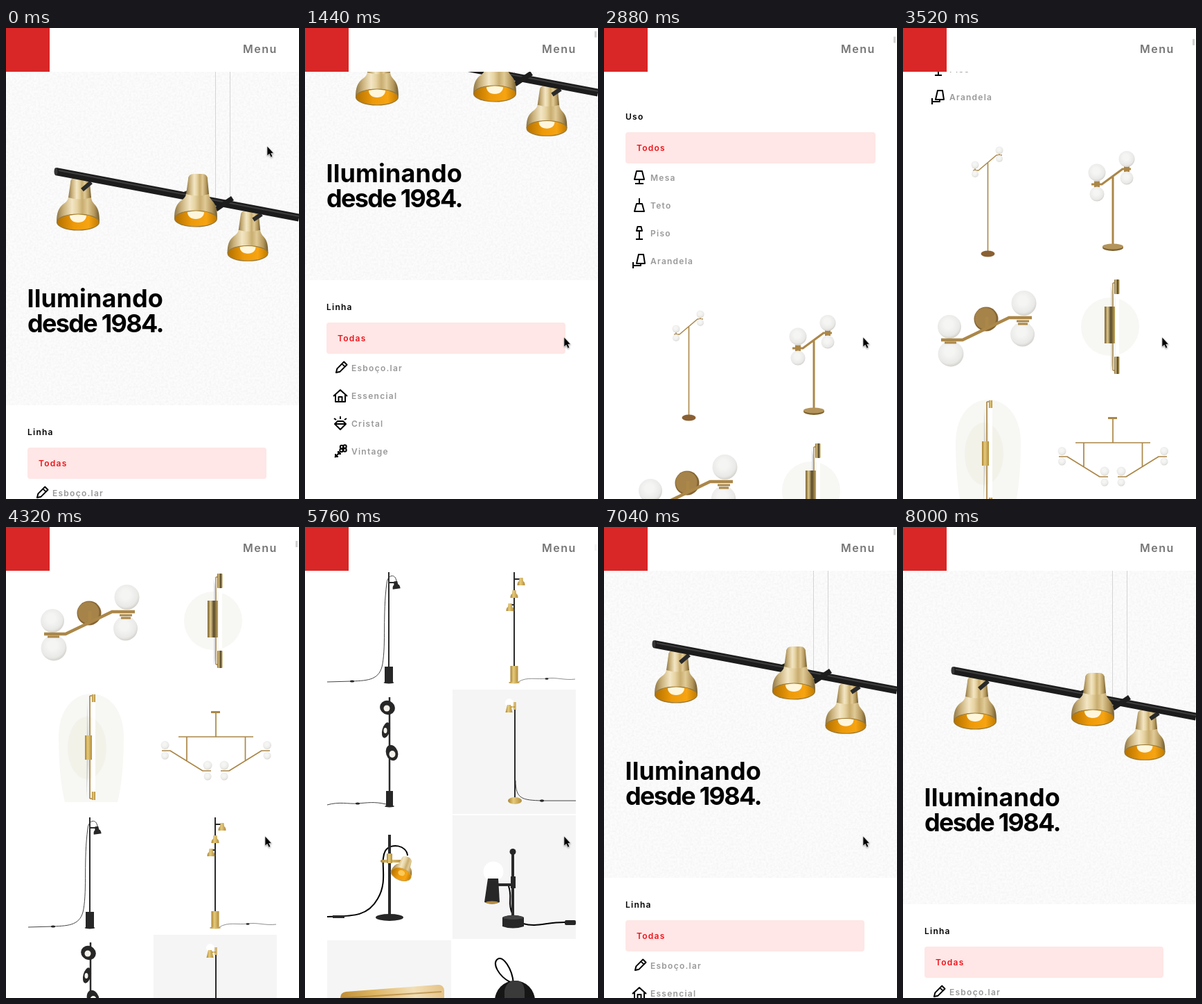
An HTML page that plays this animation: 423 by 678 pixels, repeating every 8800 ms.

```html
<!DOCTYPE html>
<html lang="pt">
<head>
<meta charset="utf-8">
<title>Iluminando</title>
<style>
@property --s { syntax: "<integer>"; inherits: true; initial-value: 0; }
html, body { margin: 0; width: 100%; height: 100%; overflow: hidden; background: #fff; }
#stage {
  position: relative; width: 423px; height: 678px; overflow: hidden; background: #fff;
  font: 600 12px Inter, "Open Sans", sans-serif; letter-spacing: 1.25px;
}
#stage, #thumb, #cursor { animation: 8.8s step-end -4ms infinite; }
#stage { animation-name: scroll; }
#page { position: absolute; left: 0; top: 0; transform: translateY(calc(var(--s) * -1px)); }
#head { position: absolute; left: 0; top: 0; width: 423px; height: 63px; background: #fff; }
#logo { width: 63px; height: 63px; background: #d92727; }
#menu { position: absolute; left: 342px; top: 20px; font-size: 16px; line-height: 20px; letter-spacing: 1.5px; color: #767676; }
#thumb {
  position: absolute; left: 418px; top: 1.5px; width: 3px; height: 9px; background: #d2d2d2;
  transform: translateY(calc(var(--s) * .0142px)); animation-name: thumb;
}
#cursor { position: absolute; left: 0; top: 0; animation-name: cursor; }

/* the page moves in ticks of 160 ms */
@keyframes scroll {
  0% { --s: 0; }
  7.2727% { --s: 0; animation-timing-function: steps(2); }
  10.909% { --s: 50; animation-timing-function: steps(3); }
  16.3636% { --s: 180; animation-timing-function: steps(9); }
  32.7272% { --s: 736; animation-timing-function: steps(9); }
  49.0909% { --s: 1267; animation-timing-function: steps(4); }
  56.3636% { --s: 1500; animation-timing-function: steps(3); }
  61.8181% { --s: 1614; }
  63.6363% { --s: 1620; }
  67.2727% { --s: 1330; }
  69.0909% { --s: 740; }
  70.909% { --s: 350; }
  72.7272% { --s: 235; animation-timing-function: steps(2); }
  76.3636% { --s: 105; animation-timing-function: steps(2); }
  80% { --s: 38; animation-timing-function: steps(3); }
  85.4545%, 100% { --s: 0; }
}
@keyframes thumb {
  0% { opacity: 0; }
  9.0909% { opacity: 1; }
  63.6363% { opacity: .6; }
  65.4545% { opacity: .25; }
  67.2727% { opacity: 1; }
  85.4545% { opacity: .4; }
  87.2727%, 100% { opacity: 0; }
}
@keyframes cursor {
  0% { transform: translate(377px, 170px); opacity: 1; }
  1.8181% { transform: translate(376px, 310px); }
  3.6363% { transform: translate(374px, 445px); opacity: 1; }
  87.2727%, 100% { transform: translate(374px, 445px); opacity: 0; }
}

svg { display: block; }
.title { font-size: 36px; font-weight: 700; }
.on { fill: #f0121a; }
.off { fill: #999; }
.pick { fill: #fee7e6; }
.icons, .line { fill: none; stroke: #000; stroke-width: 2; stroke-linejoin: round; }
.ball { fill: url(#ball); }
.brass { fill: none; stroke: #ab8748; stroke-linejoin: round; }
.gold { fill: url(#gold); }
.dark { fill: #272727; }
.cable { fill: none; stroke: #444; stroke-width: 1; }
.pole { fill: none; stroke: #2a2a2a; }
.pad { fill: #f5f5f5; }
.tint { fill: #f7f7f4; }
</style>
</head>
<body>
<div id="stage">
<svg id="page" width="423" height="2400">
  <defs>
    <filter id="grain" x="0" y="0" width="100%" height="100%" color-interpolation-filters="sRGB">
      <feTurbulence type="fractalNoise" baseFrequency=".32" numOctaves="2" seed="4"/>
      <feColorMatrix values="0 0 0 0 0  0 0 0 0 0  0 0 0 0 0  .06 0 0 0 -.02"/>
    </filter>
    <radialGradient id="ball" cx=".45" cy=".4" r=".6">
      <stop offset=".3" stop-color="#f5f5f4"/><stop offset=".8" stop-color="#e9e9e7"/><stop offset="1" stop-color="#d3d1cc"/>
    </radialGradient>
    <linearGradient id="gold">
      <stop offset="0" stop-color="#a8822f"/><stop offset=".4" stop-color="#e6cb7c"/><stop offset="1" stop-color="#b38c3a"/>
    </linearGradient>
    <linearGradient id="shade">
      <stop offset="0" stop-color="#8f7747"/><stop offset=".16" stop-color="#c9b07a"/><stop offset=".36" stop-color="#f3e6c4"/>
      <stop offset=".48" stop-color="#e6d3a2"/><stop offset=".6" stop-color="#c9ad70"/><stop offset=".72" stop-color="#e0ca96"/>
      <stop offset=".88" stop-color="#b3965a"/><stop offset="1" stop-color="#6f5a2f"/>
    </linearGradient>
    <linearGradient id="inner">
      <stop offset="0" stop-color="#b37000"/><stop offset=".4" stop-color="#ee9a08"/><stop offset=".75" stop-color="#f7a412"/><stop offset="1" stop-color="#c07a00"/>
    </linearGradient>
    <linearGradient id="panel" x1="0" y1=".2" x2="1" y2="0">
      <stop offset="0" stop-color="#c08c34"/><stop offset=".35" stop-color="#dfb766"/><stop offset=".7" stop-color="#f2dfb7"/><stop offset="1" stop-color="#e3c183"/>
    </linearGradient>
    <linearGradient id="tube">
      <stop offset="0" stop-color="#77602c"/><stop offset=".3" stop-color="#dcc588"/><stop offset=".6" stop-color="#57492c"/><stop offset="1" stop-color="#c4a657"/>
    </linearGradient>
    <g id="spot">
      <path d="M-31 2C-31-11-28-18-22-23Q-14-28-14-34H19Q19-28 24-23C29-18 31-11 31 2Z" fill="url(#shade)"/>
      <path d="M-11-54Q-11-62-3-62H9Q17-62 17-54L19-33Q2-28-14-33Z" fill="url(#shade)"/>
      <ellipse cy="2.500" rx="30.500" ry="11.500" fill="url(#inner)" stroke="#94773a" stroke-width="1.200"/>
      <path d="M-12-7Q0-10 12-7C12-1 7 3 0 3S-12-1-12-7Z" fill="#fff6dc"/>
    </g>
    <g id="mini">
      <path d="M-2.500-6H2.500L3-1Q5.500 0 5.500 5H-5.500Q-5.500 0-3-1Z"/>
    </g>
  </defs>

  <!-- hero -->
  <rect y="63" width="423" height="480" fill="#fcfcfc"/>
  <rect y="63" width="423" height="480" filter="url(#grain)"/>
  <path d="M302.500 63V250M323.500 63V244" stroke="#d4d4d4"/>
  <use href="#spot" transform="translate(104 277)"/>
  <use href="#spot" transform="translate(349 322) scale(.95)"/>
  <g class="pole">
    <path d="M110 233L123 222M357 276L369 268M252 241L262 237" stroke-width="6"/>
    <path d="M72 206.500L423 273" stroke="#1c1c1c" stroke-width="11"/>
    <path d="M76 205L423 271" stroke="#3d3d3d" stroke-width="2"/>
    <path d="M303 261L327 245" stroke="#1d1d1d" stroke-width="7"/>
  </g>
  <ellipse cx="72" cy="206.500" rx="2.500" ry="5.500" fill="#363636"/>
  <use href="#spot" transform="translate(274 272)"/>
  <g class="title">
    <text x="30.500" y="402" letter-spacing=".1">Iluminando</text>
    <text x="31" y="438" letter-spacing="-1.7">desde 1984.</text>
  </g>

  <!-- filters -->
  <rect class="pick" x="31" y="604" width="345" height="45" rx="4"/>
  <rect class="pick" x="31" y="886" width="361" height="45" rx="4"/>
  <text x="31" y="586">Linha</text>
  <text x="31" y="868">Uso</text>
  <g class="on"><text x="47" y="631">Todas</text><text x="47" y="913">Todos</text></g>
  <g class="off">
    <text x="67" y="674">Esboço.lar</text><text x="67" y="714">Essencial</text>
    <text x="67" y="754">Cristal</text><text x="67" y="794">Vintage</text>
    <text x="67" y="956">Mesa</text><text x="67" y="996">Teto</text>
    <text x="67" y="1036">Piso</text><text x="67" y="1076">Arandela</text>
  </g>
  <g class="icons">
    <path transform="translate(52 669) rotate(45)" d="M-3-9H3V5L0 10L-3 5ZM-3-5H3"/>
    <path transform="translate(51 709)" d="M-10 1L0-8L10 1M-7-1V9H7V-1M-2.500 9V2H2.500V9"/>
    <path transform="translate(51 749)" d="M-8 1L-4-3H4L8 1L0 9ZM-8 1H8M0-10V-6M-9-7L-6-5M9-7L6-5"/>
    <g transform="translate(51 789)">
      <circle cx="2" cy="-6" r="2.200"/><circle cx="6.500" cy="-6.500" r="2.200"/><circle cx="6.500" cy="-1.500" r="2.200"/><circle cx="1.500" cy="-1" r="2.200"/>
      <path d="M0 1L-8 9M-3 0V4H1M-7 4V8H-3"/>
    </g>
    <path transform="translate(51 951)" d="M-4-9H4L7 3H-7ZM0 3V9M-6 9H6"/>
    <path transform="translate(51 991)" d="M-4-2H4L7 9H-7ZM0-2V-10"/>
    <path transform="translate(51 1031)" d="M-2.500-9H2.500L4-3H-4ZM0-3V9M-5 9H5"/>
    <path transform="translate(51 1071)" d="M-1-9H6L8 4H-4ZM2 4V7H-9M-9 2V11"/>
  </g>

  <!-- globe lamps -->
  <g transform="translate(0 736)">
    <path class="brass" stroke-width="1.600" d="M122.500 429V560M101 441H109L135 419H143M104 436V444M139 415V422"/>
    <ellipse cx="122.500" cy="561" rx="10" ry="4.500" fill="#8a6033"/>
    <g class="ball">
      <circle cx="104" cy="433" r="5.500"/><circle cx="104" cy="446" r="5"/>
      <circle cx="139" cy="412" r="5.500"/><circle cx="139" cy="424" r="5"/>
    </g>
    <path class="brass" stroke-width="3" d="M303 449V548M272 461H287L317 439H329M276 458H284M276 464H284M319 436H327M319 442H327"/>
    <ellipse cx="303" cy="552" rx="15" ry="5" fill="#7d6230"/><ellipse cx="303" cy="550.500" rx="15" ry="4" fill="#b4945a"/>
    <g class="ball">
      <circle cx="280" cy="444" r="12.500"/><circle cx="280" cy="475" r="10.500"/>
      <circle cx="323" cy="424.500" r="11.500"/><circle cx="323" cy="452" r="9.500"/>
    </g>
  </g>

  <g transform="translate(0 1267)">
    <circle cx="120" cy="124" r="17.500" fill="#856534"/><circle cx="119" cy="123" r="15.500" fill="#a58349"/>
    <path class="brass" stroke="#6f5427" stroke-width="5" d="M121 121V136"/>
    <g class="ball">
      <circle cx="67" cy="135" r="17"/><circle cx="69" cy="174" r="18.500"/>
      <circle cx="174.500" cy="101" r="18"/><circle cx="172.500" cy="146" r="17.500"/>
    </g>
    <path class="brass" stroke-width="4.500" d="M55 154H86L153 122H186"/>
    <path class="brass" stroke="#8b6a33" stroke-width="3" d="M60 158H77M164 127H182M166 131H180"/>

    <circle class="tint" cx="299" cy="135" r="42"/>
    <path d="M300 75L303 90V185L300 200Z" fill="#ddd"/>
    <path class="brass" stroke-width="1.500" d="M303 72V198M303 72H306M303 198H306"/>
    <rect x="307" y="87" width="5" height="91" fill="#fff"/>
    <g fill="url(#tube)">
      <rect x="305" y="67" width="7.500" height="21" rx="1"/><rect x="305" y="178" width="7.500" height="25" rx="1"/>
      <rect x="291" y="106" width="15" height="53"/>
    </g>

    <path class="tint" d="M76 300C78 220 168 220 170 300Q170 360 161 396H85Q76 360 76 300Z"/>
    <ellipse cx="117" cy="318" rx="28" ry="45" fill="#f3f2e9"/>
    <path d="M117 250L119 300V340L116 390Z" fill="#d5d5d3"/>
    <path class="brass" stroke-width="1.700" d="M121 243V391M121 243H126M121 391H126"/>
    <rect x="124" y="252" width="5" height="129" fill="#fff"/>
    <g class="gold">
      <rect x="124" y="241" width="5" height="11"/><rect x="124" y="381" width="5" height="12"/><rect x="114" y="300" width="10" height="35"/>
    </g>

    <g class="brass" stroke-width="1.700">
      <path d="M303 268V302M249 302H357M261 302V336M345.500 302V336M225 322H237L284 351H296M381 322H369L322 351H310"/>
      <path stroke-width="3" d="M296 266.500H309"/>
    </g>
    <g class="ball">
      <circle cx="229.500" cy="314" r="6"/><circle cx="229.500" cy="329" r="5.500"/>
      <circle cx="377" cy="314" r="6"/><circle cx="377" cy="329" r="5.500"/>
      <circle cx="291" cy="343" r="6.500"/><circle cx="291" cy="359" r="5.500"/>
      <circle cx="315" cy="343" r="6.500"/><circle cx="315" cy="359" r="5.500"/>
    </g>

    <!-- floor lamps -->
    <path class="cable" d="M132 433C132 419 119 421 118 434C112 480 117 520 112 550C108 573 92 574 68 575L32 576"/>
    <path class="pole" stroke-width="2" d="M121 418V555M121 433H130"/>
    <use href="#mini" class="dark" transform="translate(131.500 437) rotate(-8)"/>
    <g class="dark">
      <rect x="115" y="554" width="12" height="23"/><ellipse cx="121" cy="577" rx="7.500" ry="1.500"/><ellipse cx="68" cy="575" rx="3" ry="1.500"/>
    </g>
    <path class="cable" stroke-opacity=".6" d="M308 576C320 568 335 573 349 571S375 574 390 572"/>
    <path class="pole" stroke-width="2" d="M302 418V555M302 428H312M302 465H296"/>
    <g class="gold">
      <use href="#mini" transform="translate(312 432)"/><use href="#mini" transform="translate(302 450)"/><use href="#mini" transform="translate(296 469)"/>
      <rect x="296.500" y="553" width="11" height="24"/><ellipse cx="302" cy="577" rx="8" ry="1.500"/>
    </g>
    <ellipse class="dark" cx="349" cy="571.500" rx="2.500" ry="1.300"/>
  </g>

  <g transform="translate(0 1620)">
    <path class="cable" d="M32 400C50 395 62 399 76 398S100 395 117 399"/>
    <path class="pole" stroke-width="2.500" d="M122 245V382"/>
    <g class="dark">
      <rect x="117" y="380" width="10" height="22"/><ellipse cx="122" cy="402" rx="7" ry="1.500"/><ellipse cx="76" cy="398" rx="3" ry="1.500"/>
      <ellipse cx="119" cy="260" rx="11" ry="10" transform="rotate(25 119 260)"/>
      <ellipse cx="117" cy="292.500" rx="5.500" ry="11.500" transform="rotate(15 117 292.500)"/>
      <ellipse cx="125.500" cy="325" rx="8.500" ry="11.500" transform="rotate(-18 125.500 325)"/>
    </g>
    <g fill="#f3f1ea">
      <circle cx="118" cy="261" r="4.500"/><ellipse cx="116" cy="293" rx="2.500" ry="4"/><ellipse cx="126" cy="327" rx="4.500" ry="5"/>
    </g>

    <rect class="pad" x="213" y="234" width="178" height="179"/>
    <circle cx="295" cy="253" r="6" fill="#fff"/>
    <path class="cable" d="M304 365C304 392 314 393 342 394H391"/>
    <path class="pole" stroke-width="2" d="M303 262V392"/>
    <g class="gold">
      <path d="M292 256H297L299.500 267H289.500Z"/><rect x="301.500" y="252" width="3" height="11"/><rect x="297" y="258" width="6" height="2"/>
      <ellipse cx="303" cy="394" rx="10" ry="5"/>
    </g>
    <ellipse class="dark" cx="342" cy="394" rx="3" ry="1.700"/>

    <!-- table lamps -->
    <path class="line" stroke-width="1.500" d="M148 473C147 458 124 454 116 466C107 482 121 508 105 535C90 562 66 560 32 561"/>
    <path class="pole" stroke-width="4" d="M122 443V560M40 561H57"/>
    <ellipse class="dark" cx="122" cy="562" rx="20" ry="5"/>
    <rect class="gold" x="109" y="479" width="32" height="4" rx="2"/><rect class="gold" x="118" y="470" width="8" height="14" rx="1"/>
    <g transform="translate(139 499) rotate(20)">
      <path d="M-7-22Q-6-26 0-26T8-22L9-13Q15-9 15 1H-15Q-15-9-8-13Z" fill="url(#shade)"/>
      <ellipse cy="1" rx="15" ry="8.500" fill="url(#inner)" stroke="#c9a04a"/>
      <ellipse cy="-1" rx="5" ry="4" fill="#f9c95a"/>
    </g>

    <rect class="pad" x="213" y="415" width="178" height="178"/>
    <circle cx="272" cy="496" r="14.500" fill="#fff"/>
    <path class="line" stroke-width="1.500" d="M294 517C300 535 292 540 299 556M315 571C335 577 350 568 378 569"/>
    <path class="pole" stroke-width="4" d="M300 467V562M275 515H302"/>
    <g class="dark">
      <circle cx="300" cy="467.500" r="4.500"/><rect x="297" y="503" width="7" height="17"/>
      <path d="M264 506H279L281 540Q270 545 259 540Z"/>
      <path d="M285 562Q300 555 316 562V575Q300 580 285 575Z"/><rect x="375" y="566" width="16" height="7" rx="2"/>
    </g>
    <ellipse cx="270" cy="540.500" rx="9" ry="2" fill="#b38b41"/>
    <ellipse cx="300.500" cy="562" rx="15" ry="3" fill="#434343"/>

    <rect class="pad" x="32" y="595" width="179" height="179"/>
    <path d="M51 760V678Q51 670 59 669L191 659Q200 658 201 667V760Z" fill="url(#panel)"/>
    <path d="M54 678L197 669" stroke="#a87a2c" stroke-opacity=".6" stroke-width="2"/>
    <circle cx="303" cy="682" r="29" fill="#161616"/>
    <path class="line" stroke-width="4" d="M301 657C299 635 286 617 278 622C270 628 279 646 296 655"/>
    <path d="M288 700V668Q290 654 303 653T317 668V700Z" fill="#3a3a3a"/>
  </g>
</svg>
<div id="head">
  <div id="logo"></div>
  <div id="menu">Menu</div>
</div>
<div id="thumb"></div>
<svg id="cursor" width="20" height="24" style="filter:drop-shadow(0 1px 1px #0006)">
  <path d="M0 0V14L3.200 11.200L5.400 16L7.800 15L5.700 10.300H9.500Z" fill="#000" stroke="#fff" stroke-width=".6"/>
</svg>
</div>
</body>
</html>
```
